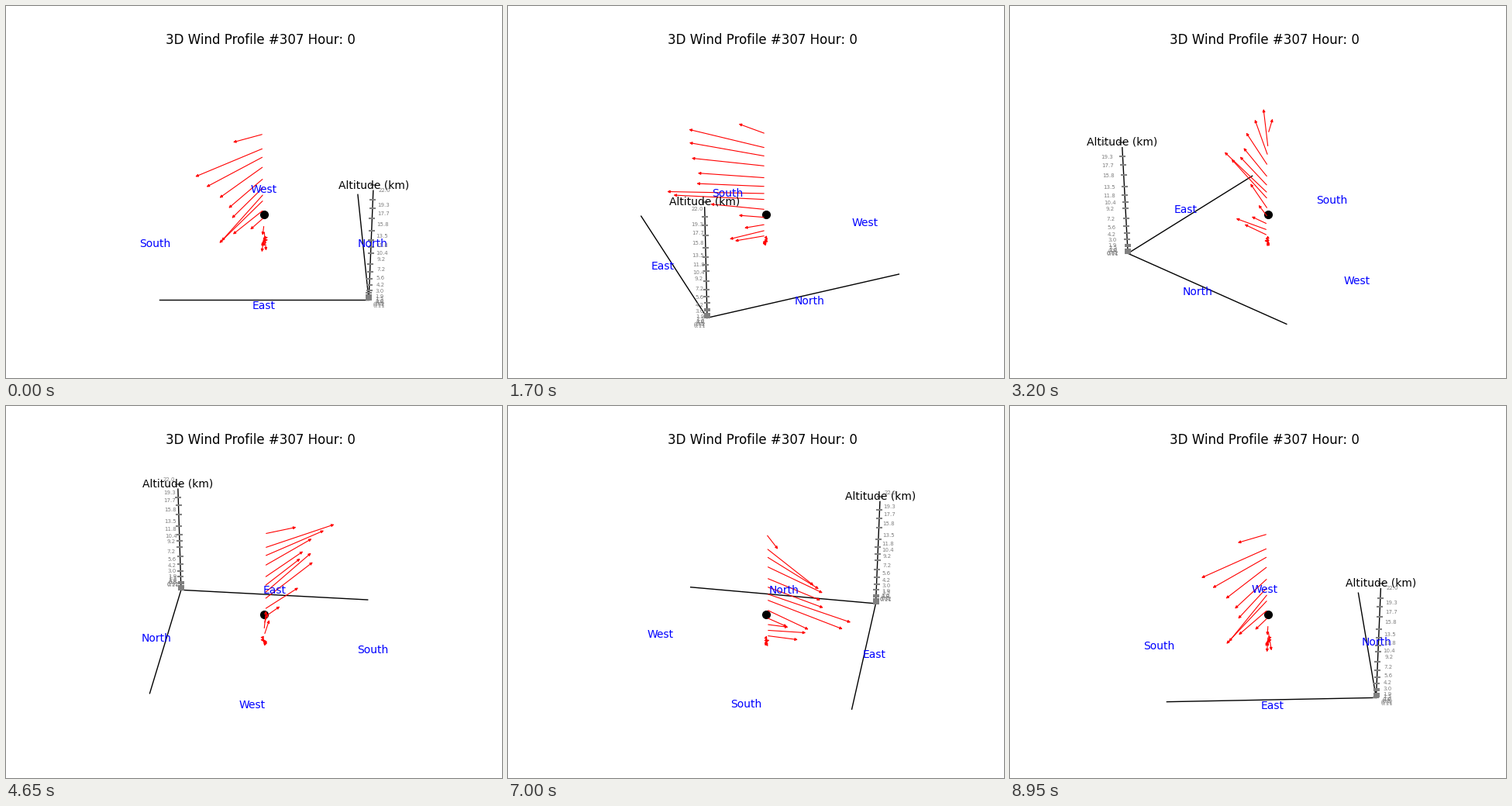
A matplotlib script that plays this animation: 640x480 px, repeating every 9000 ms.

```python
import numpy as np
import matplotlib.pyplot as plt
from matplotlib.animation import FuncAnimation
from matplotlib.patches import FancyArrowPatch

W, H, DPI = 640, 480, 100
FRAMES, INTERVAL = 180, 50

# Perspective camera: distance, pixel scale, screen centre, elevation
DIST, SCALE = 10.0, 1997.84
CX, CY = 333.0, 237.7
ELEV = np.radians(30)

EDGE = 0.652           # half side of the ground square
RIM = 1.1 * EDGE       # where the labels stand
HALF_Z = 0.4114        # half height of the altitude range

LEVELS = [0.11, 0.32, 0.5, 0.8, 1.0, 1.5, 1.9, 3.0, 4.2, 5.6,
          7.2, 9.2, 10.4, 11.8, 13.5, 15.8, 17.7, 19.3, 22.0]
LOW, TOP = LEVELS[0], LEVELS[-1]
AXIS_TOP = 21.0


def wind(km):
    """East and north parts, eased between a few key altitudes."""
    speed = np.interp(
        km, [1.5, 1.9, 3, 4.2, 5.6, 9.2, 10.4, 11.8, 13.5, 19.3, 22],
        [.025, .228, .276, .163, .195, .62, .656, .465, .46, .578, .239])
    angle = np.radians(np.interp(
        km, [.5, 1, 1.5, 1.9, 3, 4.2, 5.6, 7.2, 10.4, 15.8, 22],
        [-50, 90, 90, -4, 3, -4, -30.5, -32.7, -24.2, -34.3, -60]))
    return speed * np.cos(angle), speed * np.sin(angle)


def project(x, y, km, azim):
    """Screen position in pixels, y pointing down."""
    z = HALF_Z * (2 * (km - LOW) / (TOP - LOW) - 1)
    side = y * np.cos(azim) - x * np.sin(azim)
    near = x * np.cos(azim) + y * np.sin(azim)
    depth = DIST - near * np.cos(ELEV) - z * np.sin(ELEV)
    rise = z * np.cos(ELEV) - near * np.sin(ELEV)
    return CX + SCALE * side / depth, CY - SCALE * rise / depth


fig = plt.figure(figsize=(W / DPI, H / DPI), dpi=DPI, facecolor="white")
ax = fig.add_axes([0, 0, 1, 1])
ax.set_xlim(0, W)
ax.set_ylim(H, 0)
ax.axis("off")


def label(text, size, color):
    return ax.text(0, 0, text, fontsize=size, color=color,
                   ha="center", va="center")


def make_arrow():
    return ax.add_patch(FancyArrowPatch(
        (0, 0), (1, 1), arrowstyle="-|>", mutation_scale=5,
        color="red", lw=0.8, zorder=2.5))


ax.text(328, 49.3, "3D Wind Profile #307 Hour: 0", fontsize=12,
        ha="center", va="baseline")
ax.plot([CX], [269.2], "o", color="black", ms=7, mew=1)

# Each axis line runs from the north-east corner of the ground square
axis_ends = [(EDGE, -EDGE, LOW), (-EDGE, EDGE, LOW), (EDGE, EDGE, AXIS_TOP)]
axis_lines = [ax.plot([], [], color="black", lw=1)[0] for _ in axis_ends]
ticks, = ax.plot([], [], "_", color="gray", ms=6, mew=1.5)

arrows = [make_arrow() for _ in LEVELS]
compass = [label(name, 10, "blue")
           for name in ("East", "North", "West", "South")]
altitude = label("Altitude (km)", 10, "black")
km_labels = [label(str(km), 5, "gray") for km in LEVELS]


def update(i):
    azim = 2 * np.pi * i / FRAMES
    corner = project(EDGE, EDGE, LOW, azim)
    for line, end in zip(axis_lines, axis_ends):
        line.set_data(*zip(corner, project(*end, azim)))
    ticks.set_data(*project(EDGE, EDGE, np.array(LEVELS), azim))

    for km, arrow, text in zip(LEVELS, arrows, km_labels):
        arrow.set_positions(project(0, 0, km, azim),
                            project(*wind(km), km, azim))
        x, y = project(RIM, RIM, km, azim)
        text.set_position((x - 1, y))

    for k, text in enumerate(compass):
        turn = k * np.pi / 2
        text.set_position(
            project(RIM * np.cos(turn), RIM * np.sin(turn), LOW, azim))
    altitude.set_position(project(EDGE, EDGE, TOP, azim))
    return [*axis_lines, ticks, *arrows, *km_labels, *compass, altitude]


anim = FuncAnimation(fig, update, frames=FRAMES, interval=INTERVAL,
                     repeat=True, repeat_delay=0)
plt.show()
```
